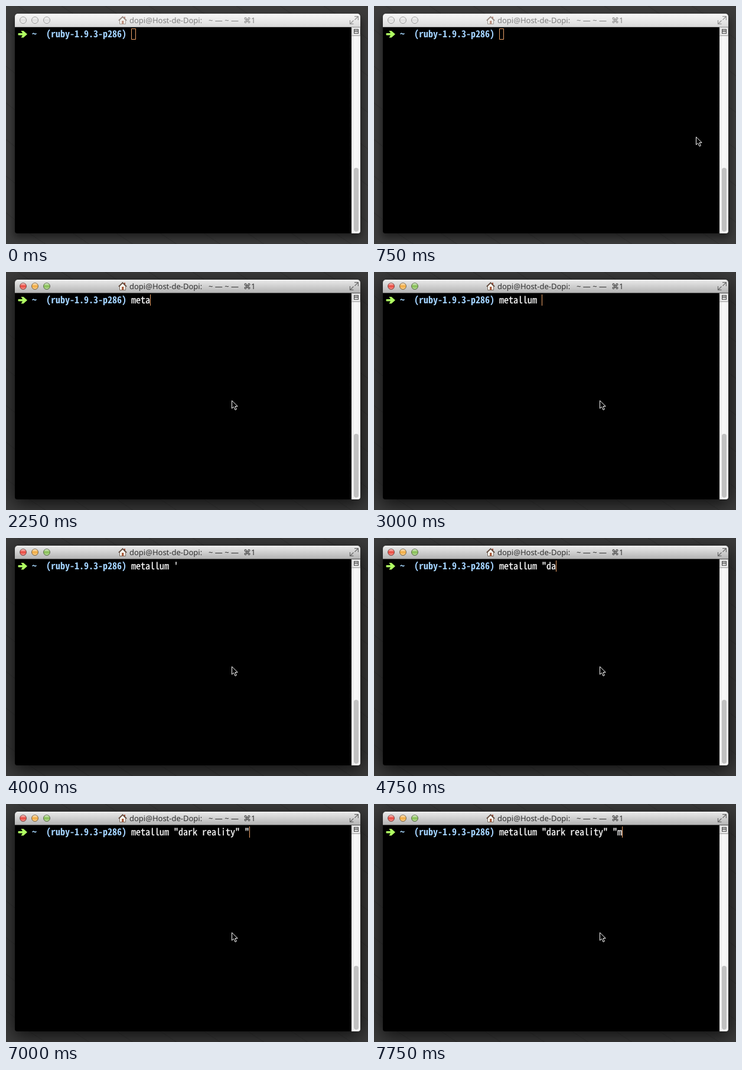
An HTML page for the animation above (8000 ms loop, 613 by 403 pixels).

```html
<!DOCTYPE html>
<html lang="en">
<head>
<meta charset="utf-8">
<title>Terminal typing</title>
<style>
  html, body { margin: 0; width: 100%; height: 100%; overflow: hidden; background: #3b3b3b; }
  svg { display: block; width: 613px; height: 403px; }
  text { white-space: pre; text-rendering: geometricPrecision; }
  .title { font: 13px "Noto Sans", "Open Sans", "DejaVu Sans", sans-serif; fill: #808080; }
  .mono { font-family: "Noto Sans Mono CJK JP", "Noto Sans Mono", "DejaVu Sans Mono", monospace; }
  .prompt { font-weight: bold; fill: #a3d3ff; }
  .command { fill: #f8f8f8; stroke: #f8f8f8; stroke-width: .3; }
  .shadow { filter: blur(7px); opacity: .5; }
  .bar { fill: url(#barIdle); }
  .rim { stroke: #a5a5a5; }
  .light { fill: #dedede; stroke: #999; }
  .house { opacity: .6; }
  .expand { fill: none; stroke: #949494; stroke-width: 1.2; }
  .caret { fill: none; stroke: #eda36a; }

  .active .title { fill: #303030; }
  .active .shadow { filter: blur(15px); opacity: .75; }
  .active .bar { fill: url(#barActive); }
  .active .rim { stroke: #5b5b5b; }
  .active .light { stroke: #0007; }
  .active .red { fill: #e9453b; }
  .active .amber { fill: #f1aa3d; }
  .active .green { fill: #83bd50; }
  .active .house { opacity: 1; }
  .active .expand { stroke: #696969; }
</style>
</head>
<body>
<svg id="stage" viewBox="0 0 613 403">
  <defs>
    <linearGradient id="barIdle" x2="0" y2="1">
      <stop stop-color="#f8f8f8"/><stop offset="1" stop-color="#d9d9d9"/>
    </linearGradient>
    <linearGradient id="barActive" x2="0" y2="1">
      <stop stop-color="#ebebeb"/><stop offset="1" stop-color="#b2b2b2"/>
    </linearGradient>
    <linearGradient id="track">
      <stop stop-color="#e4e4e4"/><stop offset=".35" stop-color="#f8f8f8"/><stop offset="1" stop-color="#f3f3f3"/>
    </linearGradient>
    <linearGradient id="gloss" x2="0" y2="1">
      <stop stop-color="#fff" stop-opacity=".75"/>
      <stop offset=".5" stop-color="#fff" stop-opacity="0"/>
      <stop offset="1" stop-color="#fff" stop-opacity=".45"/>
    </linearGradient>
    <pattern id="weave" width="74" height="62" patternUnits="userSpaceOnUse">
      <path d="M0 40L28 62M20 0L74 36M46 62L74 44" fill="none" stroke="#0002"/>
    </pattern>
  </defs>

  <rect width="613" height="403" fill="#3b3b3b"/>
  <rect width="613" height="403" fill="url(#weave)"/>
  <rect class="shadow" x="13" y="20" width="589" height="372" rx="6"/>

  <rect x="15" y="30" width="585" height="355" rx="4"/>
  <path class="bar" d="M15 36V18a5 5 0 0 1 5-5H595a5 5 0 0 1 5 5V36Z"/>
  <path d="M19 13.5H596" stroke="#fff9"/>
  <path class="rim" d="M15 35.5H600"/>

  <g id="lights"></g>

  <g class="house">
    <path d="M200 18h2v5h-2z" fill="#a4503b"/>
    <path d="M192.5 24L197.5 19L202.5 24V30.5H192.5Z" fill="#faf7f0" stroke="#75695f"/>
    <path d="M196 25h3.4v5.5H196z" fill="#a75b3d"/>
    <path d="M190.8 24.6L197.5 18L204.2 24.6" fill="none" stroke="#5f4538" stroke-width="1.6"/>
  </g>
  <text class="title" x="209" y="28.5">dopi@Host-de-Dopi:</text>
  <text class="title" x="343" y="28.5">~ — ~ —</text>
  <text class="title" x="402" y="28.5">⌘1</text>
  <path class="expand" d="M590 17.6h6.4V24M596 18L590.5 23.5M588.5 30.4h-6V24M583 30L588.5 24.5"/>

  <path d="M585 36H600V381a4 4 0 0 1-4 4H585Z" fill="url(#track)"/>
  <path d="M585 50.5H600" stroke="#b5b5b5"/>
  <rect x="586.5" y="36.5" width="13" height="13" fill="#eee" stroke="#c4c4c4"/>
  <rect x="589.5" y="39.5" width="7" height="7" fill="#eee" stroke="#444"/>
  <path d="M590 41.5h6M590 43.5h6" stroke="#444"/>
  <rect x="589" y="274" width="8" height="108" rx="4" fill="#c1c1c1"/>

  <path d="M21 46h7l-2.5-4h4L36 47.8L29.5 53.5h-4l2.5-4H21q-1.3-1.8 0-3.5Z" fill="#b0ff62"/>
  <text class="mono prompt" x="44" y="53">~</text>
  <text class="mono prompt" x="68" y="53">(ruby-1.9.3-p286)</text>
  <text class="mono command" id="command" x="212" y="53"></text>
  <path class="caret" id="caret"/>
  <path id="pointer" d="M.5 .8V14L3.6 11.2L6 16.5L8.3 15.5L6 10.4H10.2Z" stroke="#fff"/>
</svg>

<script>
const LOOP = 8000, CELL = 8, LEFT = 212;
const line = 'metallum "dark reality" "m';

// [start ms, characters typed, caret visible]
const steps = [
  [0, 0, 1], [1000, 0, 0], [1500, 0, 1], [2000, 2, 1], [2250, 4, 1],
  [2500, 6, 1], [2750, 7, 1], [3000, 9, 1], [3500, 10, 1], [4000, 10, 0],
  [4500, 10, 1], [4750, 12, 1], [5000, 13, 1], [5250, 16, 1], [5500, 18, 1],
  [5750, 20, 1], [6000, 22, 1], [6500, 23, 1], [6750, 24, 1], [7000, 25, 1],
  [7500, 25, 0], [7750, 26, 1]
];

const byId = id => document.getElementById(id);
const stage = byId('stage'), command = byId('command');
const caret = byId('caret'), pointer = byId('pointer');

byId('lights').innerHTML = ['red', 'amber', 'green'].map((name, i) => {
  const at = `cx="${29 + 20 * i}" cy="24"`;
  return `<circle class="light ${name}" ${at} r="5.5"/><circle ${at} r="5" fill="url(#gloss)"/>`;
}).join('');

// Choose the font size whose advance equals one terminal cell.
const pen = document.createElement('canvas').getContext('2d');
pen.font = '100px ' + getComputedStyle(command).fontFamily;
const size = 100 * CELL / pen.measureText('m').width;
document.querySelectorAll('.mono').forEach(el => el.style.fontSize = size + 'px');

function typedText(t, count) {
  const text = line.slice(0, count);
  // A single quote is typed first, then corrected.
  return t >= 3500 && t < 4500 ? text.replace('"', "'") : text;
}

function draw(t) {
  const active = t >= 1000;
  const [, count, visible] = steps.filter(step => step[0] <= t).pop();
  const x = LEFT + CELL * count + .5;
  const text = typedText(t, count);

  stage.classList.toggle('active', active);
  if (command.textContent !== text) command.textContent = text;
  caret.setAttribute('d', active ? `M${x} 38V57` : `M${x} 38.5h7v18h-7Z`);
  caret.style.visibility = visible ? 'visible' : 'hidden';
  pointer.style.visibility = t >= 750 ? 'visible' : 'hidden';
  pointer.setAttribute('transform', active ? 'translate(382 217)' : 'translate(545 221)');
}

const start = performance.now();
function tick() {
  draw((performance.now() - start) % LOOP);
  requestAnimationFrame(tick);
}
tick();
</script>
</body>
</html>
```
